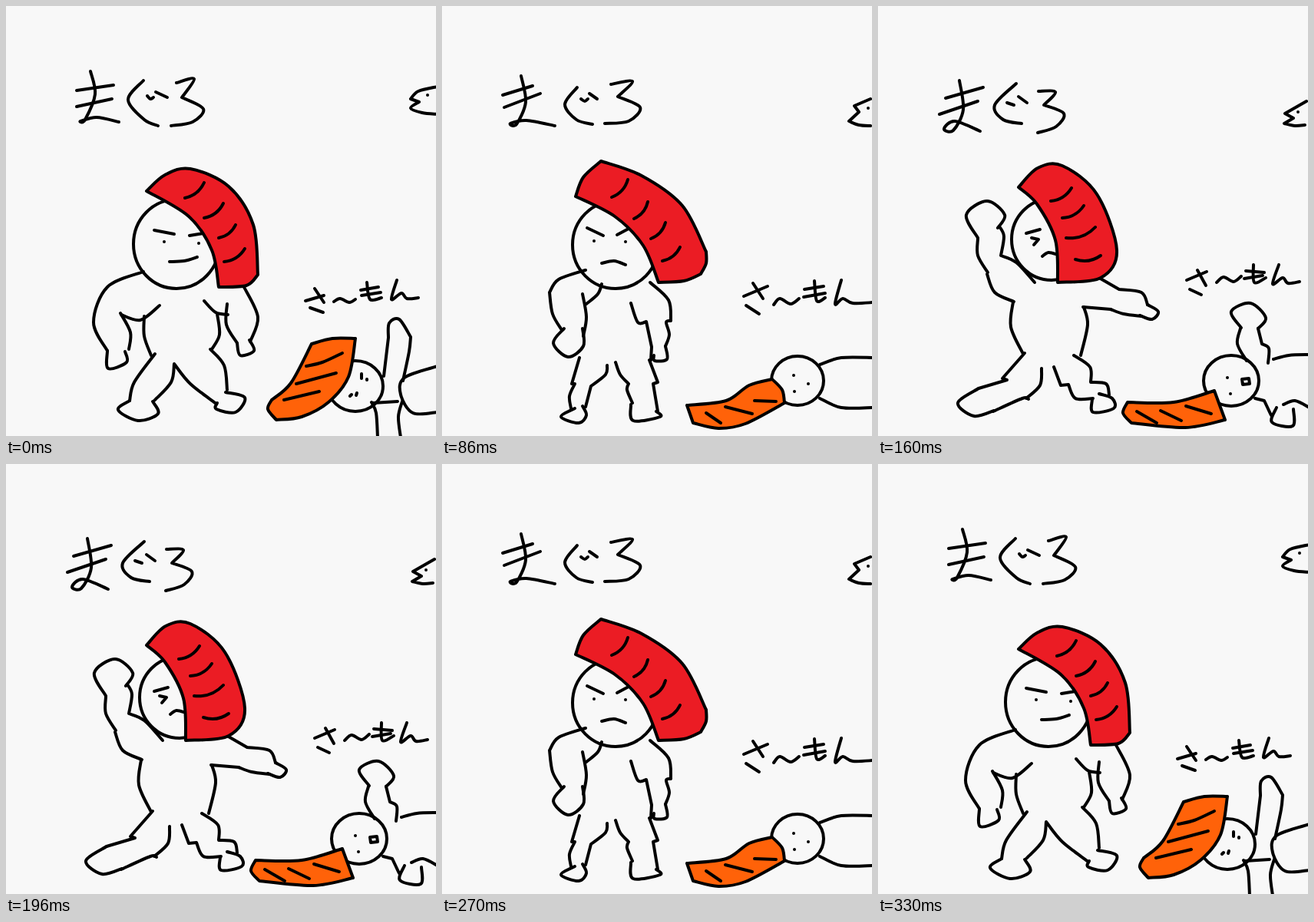
Recreate the animation shown at these times as an HTML page. Size 560 by 560 pixels, loop 380 ms.

```html
<!DOCTYPE html>
<html lang="ja">
<head>
<meta charset="utf-8">
<title>Sushi wrestlers</title>
<style>
html, body { margin: 0; width: 100%; height: 100%; overflow: hidden; background: #f8f8f8; }
svg { display: block; width: 560px; height: 560px; }
g { fill: none; stroke: #000; stroke-width: 4; stroke-linecap: round; stroke-linejoin: round; }
.tuna { fill: #eb1c24; }
.salmon { fill: #ff6209; }
</style>
</head>
<body>
<svg id="stage" viewBox="0 0 560 560"></svg>
<script>
const stage = document.getElementById("stage");
let layer = stage;

function make(tag, attrs) {
  const el = document.createElementNS("http://www.w3.org/2000/svg", tag);
  for (const key in attrs) el.setAttribute(key, attrs[key]);
  return layer.appendChild(el);
}

function toPoints(text) {
  const n = text.trim().split(/\s+/).map(Number);
  return n.filter((_, i) => i % 2 === 0).map((x, i) => [x, n[2 * i + 1]]);
}

// Catmull-Rom spline written as cubic Béziers
function curve(p) {
  let d = "";
  for (let i = 0; i < p.length - 1; i++) {
    const a = p[i - 1] || p[i], b = p[i], c = p[i + 1], e = p[i + 2] || c;
    const h1 = b.map((v, k) => v + (c[k] - a[k]) / 6);
    const h2 = c.map((v, k) => v - (e[k] - b[k]) / 6);
    d += `C${h1} ${h2} ${c}`;
  }
  return d;
}

// "/" turns the point before it into a sharp corner
function outline(text) {
  let last = null, d = "";
  for (const part of text.split("/")) {
    const p = toPoints(part);
    if (last) p.unshift(last);
    else d = "M" + p[0];
    d += curve(p);
    last = p[p.length - 1];
  }
  return d;
}

const ink = (...strokes) => strokes.forEach(s => make("path", { d: outline(s) }));
const slab = (name, text) => make("path", { d: outline(text) + "Z", class: name });
const head = (cx, cy, rx, ry) => make("ellipse", { cx, cy, rx, ry });
const dots = (...spots) => spots.forEach(s => make("path", { d: `M${s}h.01` }));

// Slightly bowed cuts in the fish slice
function cuts(...list) {
  for (const text of list) {
    const [[x, y], [u, v]] = toPoints(text);
    const cx = (x + u) / 2 + (y - v) * .25, cy = (y + v) / 2 + (u - x) * .25;
    make("path", { d: `M${x} ${y}Q${cx} ${cy} ${u} ${v}` });
  }
}

function stand() {
  // lettering
  ink("92 110 140 103", "92 131 138 121", "110 85 116 115 103 148 97 150 118 145 147 151");
  ink("179 97 159 122 180 148 198 156", "184 117 188 121 192 119", "195 112 210 119");
  ink("222 100 245 95 229 119 / 257 134 243 151 215 156");
  ink("390 384 414 377", "402 368 414 386", "396 393 413 399", "427 385 435 381 447 386 455 382");
  ink("470 360 474 382 489 380", "462 370 485 366", "463 377 488 373");
  ink("509 357 502 382 515 374 522 381 537 380");
  // fish
  ink("562 105 537 111 527 121 / 538 125 / 527 133 542 139 562 141");
  dots("549 116");
  // tuna man
  head(222, 310, 56, 58);
  ink("193 292 219 297", "239 299 257 296", "213 333 232 332 249 327");
  dots("206 307", "251 309");
  ink("179 346 132 366 114 412 132 449", "132 449 133 472 157 464 155 450");
  ink("160 447 162 425 149 400", "150 402 175 409 200 390");
  ink("180 404 180 430 189 455", "275 401 278 428 268 447");
  ink("194 453 167 490 161 514", "161 514 146 526 172 540 198 531 191 515");
  ink("193 514 215 490 219 466 / 240 492 274 518");
  ink("286 503 311 510 299 529 274 525 275 517", "266 447 284 468 288 500");
  ink("310 366 328 405 318 437", "258 384 273 399 289 402", "288 388 287 415 301 439");
  ink("301 439 305 455 323 449 317 435");
  slab("tuna", "183 241 / 207 220 240 212 290 235 322 285 328 350 / 313 364 277 366 / 268 318 238 274 183 241");
  cuts("233 250 258 230", "258 276 283 257", "277 302 299 285", "284 333 311 316");
  // salmon man
  head(455, 495, 36, 33);
  ink("463 479 463 485", "470 486 470 487", "457 504 456 507", "450 506 448 508");
  ink("492 482 498 432 / 499 413 512 408 527 431 / 525 450 517 488");
  ink("562 469 519 484 514 506 530 530 562 529");
  ink("478 517 510 515", "476 516 482 530 484 562", "516 515 511 535 514 562");
  slab("salmon", "455 433 / 425 433 398 440 / 371 491 346 513 / 341 525 352 539 / 385 535 420 516 446 483 455 433");
  ink("391 469 412 464 438 452", "378 492 430 478", "362 513 408 502");
}

function frown() {
  // lettering
  ink("79 116 118 104", "81 132 128 114", "103 91 109 125 97 154 89 153 110 149 147 156");
  ink("176 106 160 128 175 148 196 154", "181 121 186 124 190 121", "192 114 202 121");
  ink("220 102 248 98 229 118 / 258 132 243 150 212 153");
  ink("393 378 424 365", "405 361 418 381", "396 390 413 401", "432 389 440 381 454 388 465 381");
  ink("485 358 488 384 499 380", "472 369 497 365", "471 379 499 374");
  ink("520 357 512 388 522 381 535 387 562 386");
  // fish
  ink("558 121 537 130 / 543 138 / 530 150 / 543 155 558 156");
  dots("555 133");
  // tuna man
  head(226, 311, 56, 57);
  ink("189 289 210 299", "228 298 243 290", "208 335 224 332 239 337");
  dots("198 306", "239 307");
  ink("187 344 152 356 140 373 / 144 401 156 422", "159 420 145 439 164 457 184 443 183 420");
  ink("184 430 188 405 183 375", "208 362 203 375 188 388");
  ink("179 458 169 492 / 173 492 / 166 508 168 524", "173 524 155 535 178 543 188 533 183 521");
  ink("187 522 194 495 / 213 480 215 468", "226 464 232 480 243 492 / 241 500 248 517");
  ink("270 461 281 490 / 275 492 / 281 528", "246 519 249 540 284 535 279 528");
  ink("271 360 295 383 298 410 / 292 412 296 428 291 443", "291 443 293 460 277 462 276 455 / 272 461");
  ink("246 387 255 412 266 411 / 273 444 / 272 461");
  slab("tuna", "207 202 / 184 223 174 248 / 225 274 262 312 282 360 / 315 358 337 349 / 344 335 344 320 / 313 260 260 221 207 202");
  cuts("221 249 242 226", "250 277 268 255", "272 303 291 282", "287 332 310 314");
  // salmon man
  head(463, 488, 34, 32);
  dots("458 481", "477 492", "459 502");
  ink("492 467 520 458 562 458", "492 511 520 523 562 523");
  slab("salmon", "319 520 / 370 514 400 494 430 486 / 443 500 446 517 / 395 544 360 550 327 543 / 319 520");
  ink("344 530 363 543", "369 522 404 531", "407 514 435 515");
}

function flex() {
  // lettering
  ink("95 104 129 101", "92 122 131 119", "101 94 107 130 95 152 87 146 105 142 130 150");
  ink("155 96 137 118 150 130 174 137", "160 110 163 113 166 110", "170 101 179 108");
  ink("201 95 219 96 207 111 / 238 126 225 144 194 151");
  ink("386 382 412 376", "397 374 411 390", "390 394 411 403", "422 389 430 382 440 386 449 386");
  ink("475 365 473 388 489 385", "462 369 482 374", "460 379 490 380");
  ink("511 363 502 390 513 380 522 389 541 384");
  // fish
  ink("562 112 533 126 / 545 130 / 533 141 557 149");
  dots("555 123");
  // tuna man
  head(222, 314, 55, 58);
  ink("190 295 210 289", "232 291 247 296", "206 337 225 339 243 334");
  dots("201 306", "238 306");
  ink("88 318 79 285 110 265 140 285 130 304", "88 318 93 360 128 392 185 391");
  ink("131 302 131 330 120 357 / 145 344 178 343");
  ink("177 396 174 420 186 452", "272 413 273 435 267 457");
  ink("193 449 166 476 180 500 202 516", "203 513 196 533 238 544 246 522 237 511");
  ink("240 514 215 488 220 458", "225 456 243 495 270 511");
  ink("286 504 270 524 292 537 308 518 288 506", "267 456 285 475 289 504");
  ink("306 363 319 377 323 410 308 448", "249 389 256 405 274 416 284 413 / 275 435 285 447");
  ink("285 447 280 467 307 472 307 448");
  slab("tuna", "210 200 / 178 222 174 246 / 222 270 258 307 277 364 / 305 363 333 352 / 338 325 330 298 / 300 250 259 218 210 200");
  cuts("226 250 246 227", "253 269 272 249", "272 304 297 281", "290 333 314 313");
  // salmon man
  head(458, 490, 38, 32);
  ink("457 478 456 484", "453 500 453 507");
  dots("477 491");
  ink("489 464 515 445 562 432", "511 477 540 463 562 460", "527 461 553 457");
  ink("475 521 500 531 / 505 543 526 543", "526 543 530 556 542 545 530 517", "514 512 528 517 562 518");
  slab("salmon", "390 461 / 415 465 438 476 / 438 498 418 514 / 365 541 322 545 / 320 520 / 357 506 390 461");
  ink("384 491 429 490", "366 511 403 511", "341 527 367 529");
}

function lunge() {
  // lettering
  ink("88 120 137 106", "80 141 130 124", "106 97 111 135 98 162 86 160 100 150 133 163");
  ink("180 101 152 129 163 148 187 153", "168 126 177 129", "183 118 194 126");
  ink("209 111 231 112 216 129 / 242 140 232 157 208 165");
  ink("402 357 428 346", "416 344 427 364", "406 369 421 376", "441 360 450 353 463 359 473 352");
  ink("489 337 490 360 505 354", "479 345 503 347", "477 355 501 351");
  ink("522 337 514 362 527 354 534 361 549 359");
  // fish
  ink("558 124 530 140 / 541 146 / 529 153 / 543 156 556 155");
  dots("547 138");
  // tuna man
  head(226, 304, 52, 53);
  ink("193 296 211 291", "200 302 / 209 304 / 203 311", "214 326 222 321 234 324");
  ink("130 302 115 272 142 254 165 272 156 289", "130 303 130 325 143 347", "142 349 152 373 177 385");
  ink("158 287 164 300 160 325 / 180 334 204 360");
  ink("176 385 173 418 189 453", "268 392 273 415 264 455");
  ink("191 452 162 485 / 168 487 / 131 498", "131 498 104 517 125 534 151 527");
  ink("150 528 188 511 196 512", "193 511 211 494 213 472");
  ink("229 470 238 494 / 248 493 / 257 511 280 511", "279 512 280 529 307 524 305 511 288 505");
  ink("255 455 276 470 277 490 / 297 492 301 506");
  ink("288 354 314 369 / 343 373 351 389", "351 389 365 398 357 408 341 403", "267 392 303 395 / 320 401 343 404");
  slab("tuna", "183 236 / 208 211 240 208 285 245 311 318 290 354 234 360 / 231 305 207 258 183 236");
  cuts("225 254 252 237", "240 276 268 260", "245 302 283 288", "257 330 290 325");
  // salmon man
  head(460, 488, 36, 33);
  ink("474 486 / 483 485 / 484 492 / 475 493 / 474 486");
  dots("455 484", "459 505");
  ink("473 419 460 398 485 387 505 406 495 420", "472 420 468 440 480 462", "495 420 500 440 / 509 446 508 465");
  ink("515 460 535 455 562 454", "491 511 503 514 / 512 533");
  ink("519 523 513 542 540 547 541 525", "528 519 543 514 562 523");
  slab("salmon", "325 516 / 385 516 438 501 / 452 539 / 400 549 330 543 / 319 530 325 516");
  ink("337 528 363 543", "368 527 395 540", "401 521 434 531");
}

function build(pose) {
  layer = stage;
  layer = make("g", { visibility: "hidden" });
  pose();
  return layer;
}

const [a, b, c, d] = [stand, frown, flex, lunge].map(build);
const steps = [[50, a], [110, b], [160, c], [220, d], [270, c], [330, b], [380, a]];
let shown = null;

function tick() {
  const t = performance.now() % 380;
  const next = steps.find(([end]) => t < end)[1];
  if (next !== shown) {
    if (shown) shown.setAttribute("visibility", "hidden");
    next.setAttribute("visibility", "visible");
    shown = next;
  }
  requestAnimationFrame(tick);
}
tick();
</script>
</body>
</html>
```
